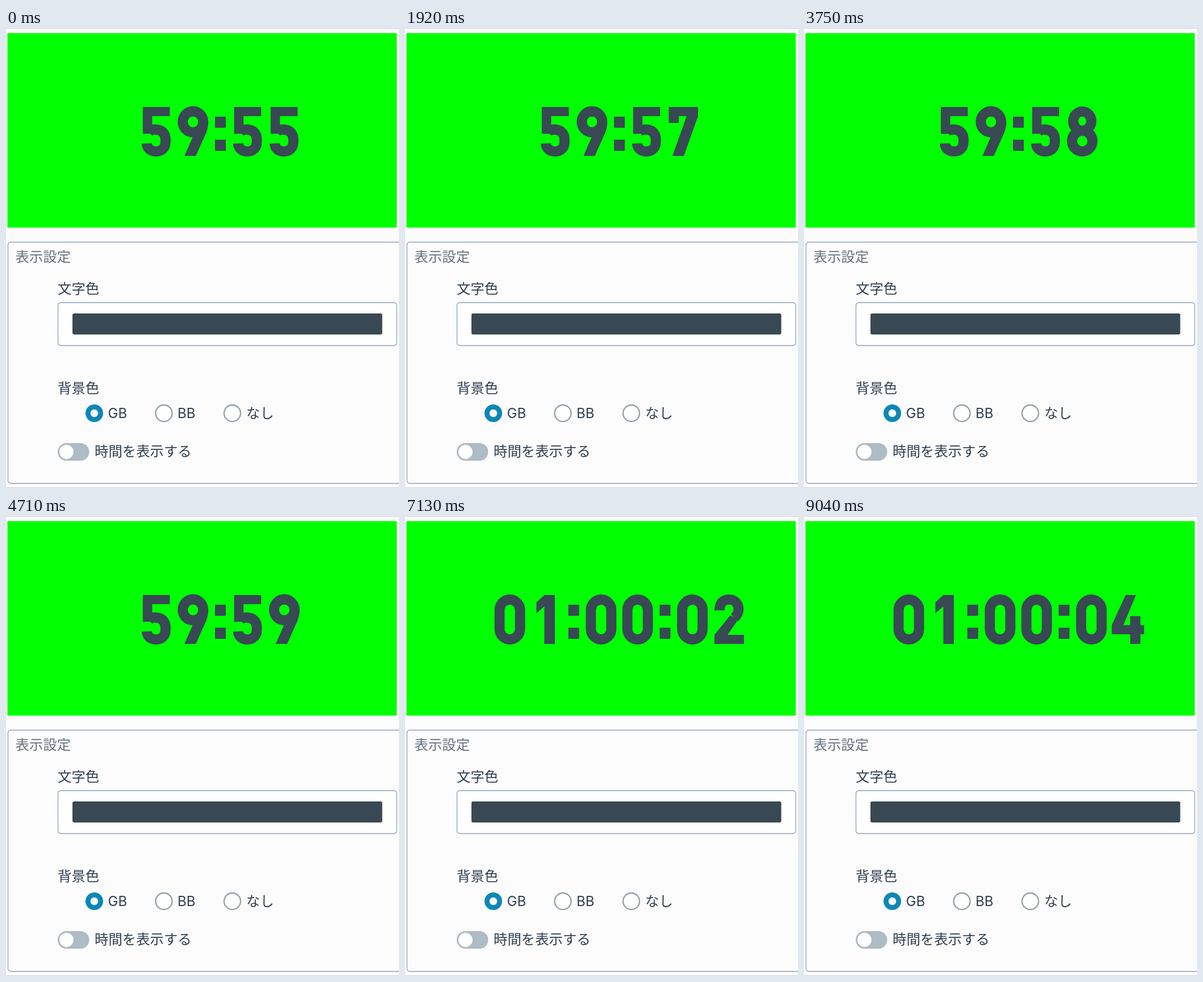
Write an HTML page that moves like this. It is 692 by 809 pixels and loops after 9.08 s.

```html
<!DOCTYPE html>
<html lang="ja">
<head>
<meta charset="utf-8">
<title>タイマー</title>
<style>
  html, body { margin: 0; width: 100%; height: 100%; overflow: hidden; background: #fcfcfc; }
  svg { display: block; }
  text { font: 24.4px "Noto Sans CJK JP", "Noto Sans CJK", sans-serif; fill: #2f3f50; }
  .latin { font: 24px Inter, sans-serif; }
  .frame { fill: none; stroke: #8fa0b8; stroke-width: 1.3; }
  .radio { fill: #fff; stroke: #919fa9; stroke-width: 2.3; }
</style>
</head>
<body>
<svg width="692" height="809" viewBox="0 0 692 809">
  <path d="M0 .5H692M0 808.5H692" stroke="#cdcfd2"/>
  <rect x="2.5" y="9" width="685.5" height="342" fill="#0f0"/>
  <g id="clock" role="timer" fill="#384954" stroke="#384954"></g>

  <rect class="frame" x="3.5" y="376.5" width="720" height="424.5" rx="5"/>
  <text x="16.5" y="411" style="fill:#65717f">表示設定</text>

  <text x="91" y="466.5">文字色</text>
  <rect class="frame" x="91.5" y="483" width="596.5" height="75.5" rx="5" style="fill:#fff"/>
  <rect x="117" y="502" width="545.5" height="37" rx="3" fill="#384954"/>

  <text x="91" y="641.5">背景色</text>
  <circle cx="155.5" cy="677.5" r="15.5" fill="#0e87b6"/>
  <circle cx="155.5" cy="677.5" r="6.8" fill="#fff"/>
  <circle class="radio" cx="278" cy="677.5" r="14.5"/>
  <circle class="radio" cx="398.5" cy="677.5" r="14.5"/>
  <text class="latin" x="179.5" y="686">GB</text>
  <text class="latin" x="302" y="686">BB</text>
  <text x="423" y="685.5">なし</text>

  <rect x="91" y="730" width="55.5" height="31" rx="15.5" fill="#adbcc5"/>
  <circle cx="106.5" cy="745.5" r="12.4" fill="#fff"/>
  <text x="156" y="753">時間を表示する</text>
</svg>
<script>
const LOOP = 9080, START = 3595, LEAD = 230;
const CELL = 64.3, CENTER = 377.6, TOP = 138;

// Each glyph: filled outline, stroked centre line.
const six = [
  'M27 1H47L33 33L21 46L14 61H5Q5 50 9.5 40Z',
  'M14 61a18 18.5 0 0 1 36 0a18 18.5 0 0 1-36 0Z'
];
const glyphs = {
  0: ['', 'M14 27a18 18 0 0 1 36 0v34a18 18 0 0 1-36 0Z'],
  1: ['M47 1V87H28.5V21L14.5 33V14L28.5 1Z', ''],
  2: ['M6.5 71L34 37L49 43L29.5 71H58.5V87H6.5Z',
      'M15.5 28C15.5 15 22 8.8 32 8.8C42 8.8 49 16 49 26C49 32 46.5 36 42 41'],
  3: ['', 'M15 24C15.5 14 22 8.8 31.5 8.8C42 8.8 48 15 48 25C48 36 42 42.5 26 42.5' +
      'C43 42.5 49.5 50 49.5 61C49.5 73 42 79.2 32 79.2C22 79.2 14.5 74 14.5 64'],
  4: ['M28 1H46L24 54H36V38H54V54H60.5V70H54V87H36V70H3.5V54Z', ''],
  5: ['M8 1H55.5V17H24.5V48H8Z',
      'M18 45Q22 40.5 30 40.5C42 40.5 48 48 48 58V62C48 73 41 79.2 31.5 79.2C22 79.2 15.5 74 15 65'],
  6: six,
  7: ['M6.5 1H58V17L33 87H13L38 17H24V29H6.5Z', ''],
  8: ['', 'M32 8.8a16 16.9 0 0 1 0 33.8a16 16.9 0 0 1 0-33.8Z' +
      'M32 42.6a18 18.3 0 0 1 0 36.6a18 18.3 0 0 1 0-36.6Z'],
  9: six,
  ':': ['M6.5 18H25.5V37.5H6.5ZM6.5 58.5H25.5V78H6.5Z', '']
};

const clock = document.getElementById('clock');
const width = c => c === ':' ? CELL / 2 : CELL;
const pad = n => String(n).padStart(2, '0');

function format(total) {
  const hours = Math.floor(total / 3600);
  const rest = pad(Math.floor(total / 60) % 60) + ':' + pad(total % 60);
  return hours ? pad(hours) + ':' + rest : rest;
}

function drawClock(label) {
  const chars = [...label];
  let x = CENTER - chars.reduce((sum, c) => sum + width(c), 0) / 2;
  clock.innerHTML = chars.map(c => {
    const [solid, line] = glyphs[c];
    const turn = c === '9' ? ' rotate(180 32 44)' : '';
    const g = `<g transform="translate(${x} ${TOP})${turn}">` +
      `<path d="${solid}" stroke="none"/><path d="${line}" fill="none" stroke-width="17.8"/></g>`;
    x += width(c);
    return g;
  }).join('');
  clock.setAttribute('aria-label', label);
}

let shown;
const origin = performance.now();
function tick() {
  const t = (performance.now() - origin) % LOOP;
  const label = format(START + Math.floor((t + LEAD) / 1000));
  if (label !== shown) drawClock(shown = label);
  requestAnimationFrame(tick);
}
tick();
</script>
</body>
</html>
```
